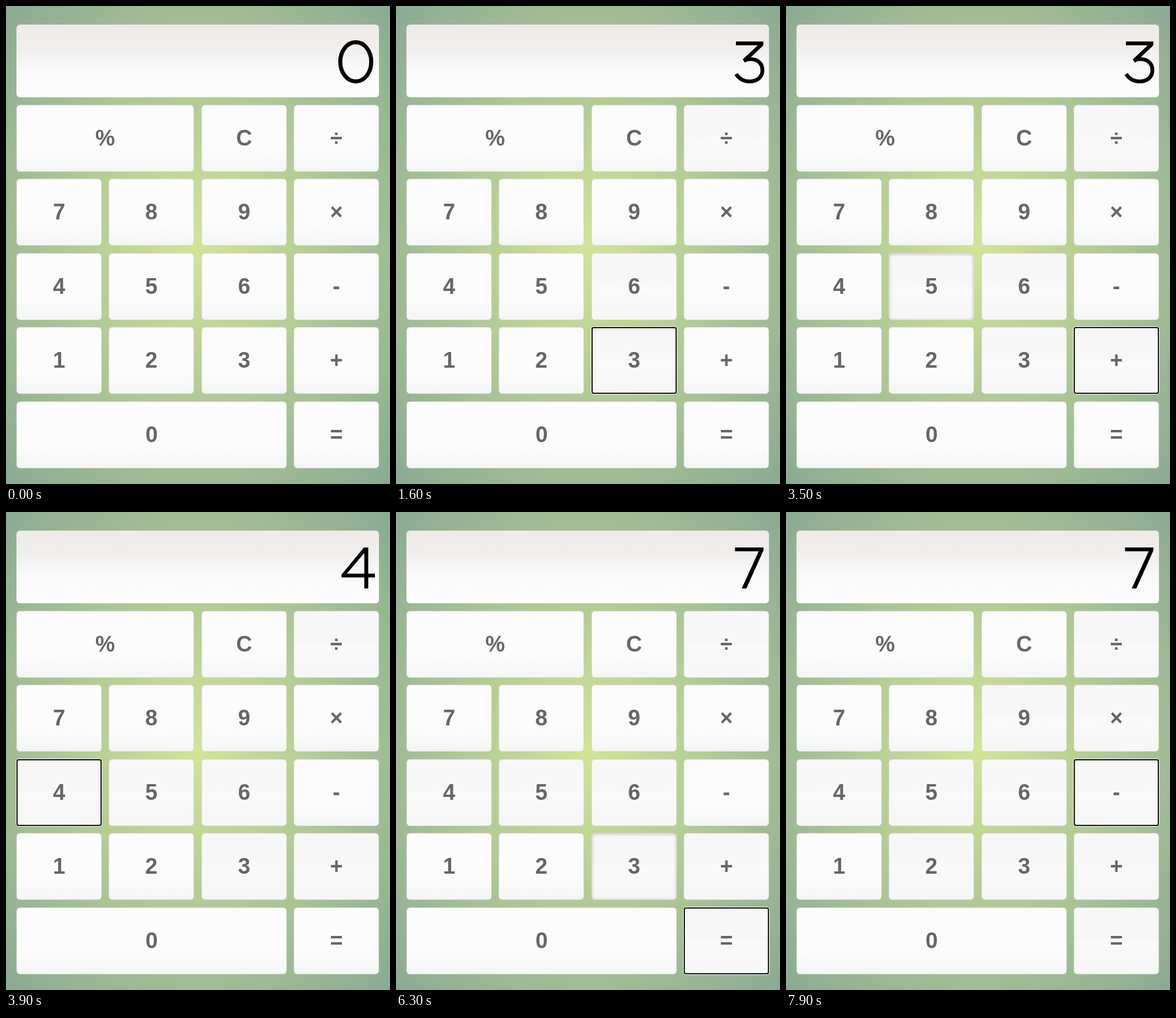
Recreate the animation shown at these times as an HTML page. Size 662 by 822 pixels, loop 8000 ms.

```html
<!DOCTYPE html>
<html lang="en">
<head>
<meta charset="utf-8">
<title>Calculator</title>
<style>
  html, body { margin: 0; width: 100%; height: 100%; overflow: hidden; }
  body { position: relative; background: radial-gradient(ellipse farthest-corner at 331px 411px, #d2e596, #8aaa93); }
  .screen {
    position: absolute; left: 18px; top: 32px; width: 625px; height: 125px; border-radius: 6px;
    background: linear-gradient(#eeeae8, #f0eeec 28%, #f9f9f9 62%, #fdfdfd);
  }
  svg { position: absolute; left: 0; top: 0; }
  .key {
    position: absolute; box-sizing: border-box; height: 115px;
    display: flex; align-items: center; justify-content: center;
    border: 1px solid #dcdfda; border-radius: 6px;
    background: linear-gradient(#fcfcfc 65%, #f4f5f6);
    color: #666; font: bold 38px "Liberation Sans", Arial, sans-serif;
  }
  .seen { background: linear-gradient(#f7f7f7 47%, #fafafa 53%, #f8f8f8 64%, #f6f6f7); }
  .hover { --inner: inset 0 1px 5px rgba(0, 0, 0, .22); box-shadow: var(--inner); }
  .focus {
    border-radius: 4px; outline: 2px solid #101010; outline-offset: -2px;
    box-shadow: var(--inner, 0 0 transparent), 0 0 0 1px #fff;
  }
  .down { transform: translateY(2px); }
</style>
</head>
<body>
<div class="screen"></div>
<svg width="662" height="822" role="img" aria-label="0">
  <g id="d0" fill="none" stroke="#000" stroke-width="7">
    <ellipse cx="603" cy="96" rx="26.7" ry="33.7"/>
  </g>
  <g id="d3" fill="none" stroke="#000" stroke-width="6.6">
    <path d="M586 64.3H633.3M630.3 66L601 93.5"/>
    <path d="M599.5 94.5C603 92.2 606.5 91.3 610.5 91.3C624 91.3 631.7 99 631.7 110.5C631.7 122 622.5 129.7 609.5 129.7C599 129.7 591.5 125 586.3 117"/>
  </g>
  <path id="d4" fill-rule="evenodd" d="M617 61H624.5V106H636V112.4H624.5V131.5H617.7V112.4H578.5V107.5ZM617.7 70.5L587.5 106H617.7Z"/>
  <path id="d7" d="M584.5 61H633.5V66L604 131.5H596L625.3 67.5H584.5Z"/>
</svg>
<script>
const LOOP = 8000, PRESS = 100;
const colX = [18, 177, 337, 496], rowY = [170, 297, 425, 552, 680];

// A repeated label spans several columns.
const layout = ["%%C÷", "789×", "456-", "123+", "000="];

// Pointer path: time and the key beneath it.
const hovers = [
  [600, "÷"], [700, ""], [800, "6"], [1000, "3"], [2300, "+"],
  [3300, "3"], [3400, "6"], [3500, "5"], [3600, "4"],
  [4200, "3"], [4300, "="], [6200, "+"], [6300, "3"], [6700, "2"],
  [6900, "6"], [7000, "9"], [7100, "×"], [7500, "-"]
];

// Clicks: time, key and the digit shown on release.
const clicks = [[1500, "3", "3"], [2900, "+", "3"], [3800, "4", "4"], [4800, "=", "7"], [7800, "-", "7"]];

const keys = {};
layout.forEach((row, r) => {
  for (const label of new Set(row)) {
    const first = row.indexOf(label), last = row.lastIndexOf(label);
    const el = document.createElement("div");
    el.className = "key";
    el.textContent = label;
    el.style.left = colX[first] + "px";
    el.style.top = rowY[r] + "px";
    el.style.width = colX[last] + 147 - colX[first] + "px";
    document.body.append(el);
    keys[label] = el;
  }
});

const screen = document.querySelector("svg");
const digits = ["0", "3", "4", "7"].map(d => [d, document.getElementById("d" + d)]);
const latest = (list, t) => list.filter(e => e[0] <= t).pop() || [];

function draw(t) {
  const hover = latest(hovers, t)[1];
  const [pressedAt, focus] = latest(clicks, t);
  const held = t - pressedAt < PRESS;
  const value = latest(clicks, t - PRESS)[2] || "0";
  const seen = new Set(hovers.filter(e => e[0] <= t).map(e => e[1]));

  for (const label in keys) {
    const list = keys[label].classList;
    list.toggle("seen", seen.has(label));
    list.toggle("hover", label === hover);
    list.toggle("focus", label === focus);
    list.toggle("down", held && label === focus);
  }
  for (const [d, shape] of digits) shape.style.display = d === value ? "" : "none";
  screen.setAttribute("aria-label", value);
}

const start = performance.now();
function tick() {
  draw((performance.now() - start) % LOOP);
  requestAnimationFrame(tick);
}
tick();
</script>
</body>
</html>
```
